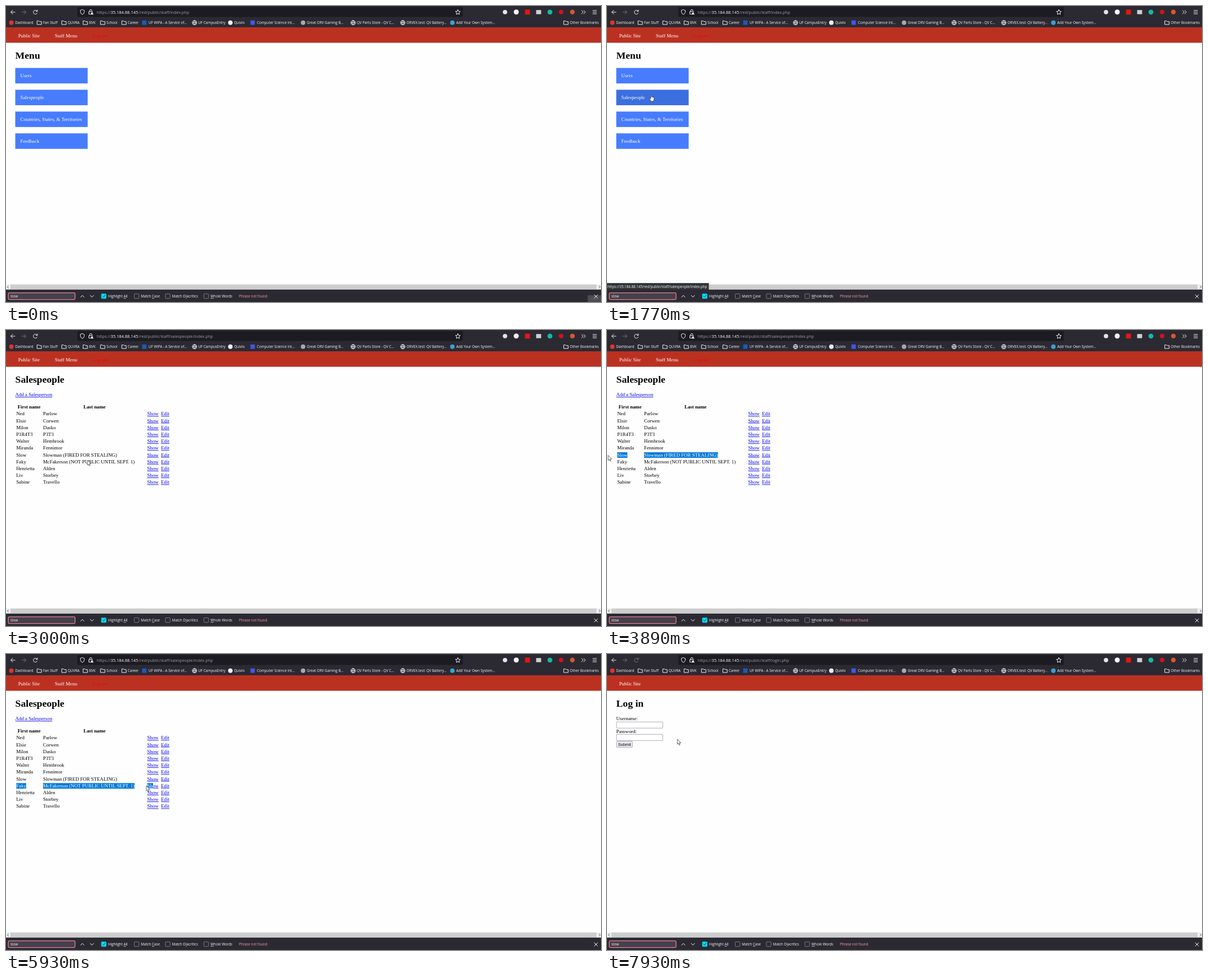
An HTML page for the animation above (8 s loop, 1060 by 528 pixels).

```html
<!DOCTYPE html>
<html lang="en">
<head>
<meta charset="utf-8">
<title>Staff menu walkthrough</title>
<style>
html, body { margin: 0; width: 100%; height: 100%; overflow: hidden; background: #fefefe; }
svg { display: block; width: 1060px; height: 528px; }
text { white-space: pre; }
.ui { font: 6.25px "Open Sans", "Noto Sans", sans-serif; fill: #f6f6f8; }
.url { font-size: 7.2px; fill: #a09fa8; }
.page { font: 8.83px "Liberation Serif", "Times New Roman", serif; fill: #000; }
.title { font-size: 17.67px; font-weight: bold; }
.bold { font-weight: bold; }
.white { fill: #fff; }
.link { fill: #0000ee; text-decoration: underline; }
.line { fill: none; stroke: #f0f0f4; stroke-width: 1; stroke-linecap: round; stroke-linejoin: round; }
.dim { opacity: .35; }
</style>
</head>
<body>
<svg id="stage" viewBox="0 0 1060 528" xmlns="http://www.w3.org/2000/svg"></svg>
<script>
const stage = document.getElementById('stage');
const LOOP = 8000, STEP = 68;

function add(parent, tag, attrs = {}, content = '') {
  const el = document.createElementNS(stage.namespaceURI, tag);
  for (const key in attrs) el.setAttribute(key, attrs[key]);
  el.textContent = content;
  parent.append(el);
  return el;
}
const group = (parent, attrs) => add(parent, 'g', attrs);
const rect = (parent, x, y, width, height, fill, more) =>
  add(parent, 'rect', { x, y, width, height, fill, ...more });
const dot = (parent, cx, cy, r, fill) => add(parent, 'circle', { cx, cy, r, fill });
const line = (parent, d, more) => add(parent, 'path', { d, class: 'line', ...more });
const text = (parent, x, y, content, cls) => add(parent, 'text', { x, y, class: cls }, content);
const show = (el, on) => { el.style.display = on ? '' : 'none'; };
const within = (t, spans) => spans.some(([from, to]) => t >= from && t < to);

rect(stage, 0, 0, 1060, 528, '#fefefe');

// Navigation strip
rect(stage, 0, 38, 1060, 27.6, '#bb3121');
text(stage, 21.7, 55.5, 'Public Site', 'page white');
const staffNav = group(stage);
text(staffNav, 87, 55.5, 'Staff Menu', 'page white');
text(staffNav, 153.5, 55.5, 'Log out', 'page').style.fill = '#e00c12';

// Menu page
const menu = group(stage);
text(menu, 16.6, 94.3, 'Menu', 'page title');
const buttons = ['Users', 'Salespeople', 'Countries, States, & Territories', 'Feedback'].map((label, i) => {
  const y = 110.5 + i * 38.9;
  const box = rect(menu, 16.5, y, 129, 27.6, '#477cfe');
  text(menu, 25.5, y + 16.8, label, 'page white');
  return box;
});

// Salespeople page
const rows = [
  ['Ned', 'Parlow'], ['Elsie', 'Corwen'], ['Milon', 'Dasko'], ['P1R4T3', 'P3T3'],
  ['Walter', 'Hembrook'], ['Miranda', 'Fennimor'], ['Slow', 'Slowman (FIRED FOR STEALING)'],
  ['Faky', 'McFakerson (NOT PUBLIC UNTIL SEPT. 1)'], ['Henrietta', 'Alden'],
  ['Liv', 'Storbey'], ['Sabine', 'Travello']
];
const columns = [18.2, 66, 251.6, 276.2];
const rowY = i => 152.4 + i * 12.2;
const sales = group(stage);
text(sales, 16.6, 94.3, 'Salespeople', 'page title');
text(sales, 16.6, 118.4, 'Add a Salesperson', 'page link');
text(sales, 20.7, 140.2, 'First name', 'page bold');
text(sales, 138, 140.2, 'Last name', 'page bold');
rows.forEach((names, i) => [...names, 'Show', 'Edit'].forEach((cell, c) =>
  text(sales, columns[c], rowY(i), cell, c < 2 ? 'page' : 'page link')));

function makeSelection(row) {
  const id = 'clip' + row;
  const window = rect(add(stage, 'clipPath', { id }), 0, rowY(row) - 9, 0, 13);
  const g = group(sales, { 'clip-path': `url(#${id})` });
  [...rows[row], 'Show'].forEach((cell, c) => {
    const back = rect(g, columns[c], rowY(row) - 7.5, 0, 9.9, '#0078d7');
    const label = text(g, columns[c], rowY(row), cell, 'page white');
    if (c === 2) label.style.textDecoration = 'underline';
    back.setAttribute('width', label.getComputedTextLength());
  });
  return (from, to) => {
    window.setAttribute('x', from);
    window.setAttribute('width', Math.max(0, to - from));
  };
}
const selectFired = makeSelection(6), selectHidden = makeSelection(7);

// Login page
const login = group(stage);
text(login, 16.6, 94.3, 'Log in', 'page title');
['Username:', 'Password:'].forEach((label, i) => {
  text(login, 16.6, 118.3 + i * 22.3, label, 'page');
  rect(login, 17, 121.2 + i * 22.2, 82.3, 11, '#fff', { stroke: '#8f8f9d', 'stroke-width': .7, rx: .5 });
});
rect(login, 17, 155.7, 28.2, 11, '#e9e9ed', { stroke: '#8f8f9d', 'stroke-width': .7, rx: 1.5 });
text(login, 19.7, 163.9, 'Submit', 'page').style.font = '7.36px "Liberation Sans", Arial, sans-serif';

// Toolbar
rect(stage, 0, 0, 1060, 38, '#2b2a33');
rect(stage, 127, 1.8, 687, 17.6, '#1c1b22', { rx: 2.2 });
line(stage, 'M16 11H8.5M12 7.5L8.5 11L12 14.5');
line(stage, 'M28 11H35.5M32 7.5L35.5 11L32 14.5', { class: 'line dim' });
const reload = line(stage, 'M55.3 9A3.6 3.6 0 1 0 55.6 12.5M56 7V9.5H53.5');
const stop = line(stage, 'M49 8L55 14M55 8L49 14');
line(stage, 'M136 6.5L139.5 8C139.7 11.5 138.8 13.8 136 15.3C133.2 13.8 132.3 11.5 132.5 8Z');
line(stage, 'M149 10V8.4A2 2 0 0 1 153 8.4V10M148 10H154V14.5H148Z');
add(stage, 'path', { d: 'M153 10L156.5 15.5H149.8Z', fill: '#f0f0f4', stroke: '#1c1b22', 'stroke-width': .6 });
line(stage, 'M805 6.6L806.3 9.4L809.3 9.8L807.1 11.9L807.6 15L805 13.5L802.4 15L802.9 11.9L800.7 9.8L803.7 9.4Z',
  { 'stroke-width': .8 });
text(stage, 161.8, 13.7, 'https://', 'ui url');
const host = text(stage, 186.4, 13.7, '35.184.88.145', 'ui url');
host.style.cssText = 'fill:#fbfbfe;font-size:7.5px;font-weight:500';
const path = text(stage, 236, 13.7, '', 'ui url');

dot(stage, 889, 10.8, 3.9, '#e4e4e8');
dot(stage, 909, 10.8, 4.5, '#f4f4f6');
rect(stage, 924.7, 6.5, 8.7, 8.7, '#e81515');
rect(stage, 944.5, 7.2, 8.8, 7.4, '#d0d0d4');
dot(stage, 969, 10.8, 4.4, '#13b9a8');
dot(stage, 989, 10.8, 4, '#d5101b');
dot(stage, 1009, 10.8, 4.2, '#d5582e');
line(stage, 'M1025.5 8L1028.3 11L1025.5 14M1029.3 8L1032.1 11L1029.3 14');
line(stage, 'M1045.5 8H1052M1045.5 11H1052M1045.5 14H1052', { 'stroke-width': .8 });

// Bookmarks: icon kind or colour, text position, label
function folder(x) {
  line(stage, `M${x - 3.7} 26.7H${x - .8}L${x + .3} 27.8H${x + 3.8}V33H${x - 3.7}Z`, { 'stroke-width': .8 });
}
function globe(x) {
  line(stage, `M${x - 3.9} 29.8A3.9 3.9 0 1 1 ${x + 3.9} 29.8A3.9 3.9 0 1 1 ${x - 3.9} 29.8H${x + 3.9}` +
    `M${x} 25.9Q${x - 3.5} 29.8 ${x} 33.7Q${x + 3.5} 29.8 ${x} 25.9`, { 'stroke-width': .75 });
}
[
  ['#e0342c', 16.3, 'Dashboard'], [folder, 66, 'Fan Stuff'], [folder, 110, 'QUVRA'], [folder, 148, 'BVK'],
  [folder, 179, 'School'], [folder, 217, 'Career'], ['#1e59b5', 254, 'UF WIPA - A Service of...', 1],
  [globe, 342.5, 'UF CampusEntry'], ['#f1f1f1', 406.5, 'Quivlo'], ['#4255e6', 447, 'Computer Science Int...', 1],
  ['#aaa9a7', 536, 'Great ORV Gaming B...'], [globe, 625, 'QV Parts Store - QV C...'],
  [globe, 713.5, 'ORVEX.test: QV Battery...'], ['#3aa0d2', 802, 'Add Your Own System...'],
  [folder, 1004.3, 'Other Bookmarks']
].forEach(([icon, x, label, square]) => {
  if (typeof icon === 'function') icon(x - 6.6);
  else if (square) rect(stage, x - 11.5, 25.8, 7.8, 7.8, icon);
  else dot(stage, x - 6.8, 29.7, 4, icon);
  text(stage, x, 32.1, label, 'ui');
});

// Scrollbar and find bar
rect(stage, 0, 496.4, 1060, 9.6, '#f0f0f0');
rect(stage, 8, 496.8, 1044, 8.6, '#cdcdcd');
line(stage, 'M4.4 499L2.4 501.1L4.4 503.2M1056.6 499L1058.6 501.1L1056.6 503.2', { style: 'stroke:#505050' });
rect(stage, 0, 505.8, 1060, 22.2, '#2b2a33');
rect(stage, 4, 511.6, 119, 12, '#42414d', { stroke: '#f08088', 'stroke-width': 1.3, rx: 1.8 });
text(stage, 8, 520, 'slow', 'ui');
line(stage, 'M133 519.3L136 516.2L139 519.3M150 516.2L153 519.3L156 516.2');
[
  [170, 'Highlight ', 'A', 'll'], [228.5, 'Match ', 'C', 'ase'],
  [284, 'Match D', 'i', 'acritics'], [352.5, '', 'W', 'hole Words']
].forEach(([x, before, key, after], i) => {
  rect(stage, x, 513.4, 8.3, 8.3, i ? '#2b2a33' : '#00ddff',
    { stroke: i ? '#8f8f9d' : '#00ddff', 'stroke-width': .8, rx: 1 });
  const label = text(stage, x + 11.8, 520, before, 'ui');
  add(label, 'tspan', { 'text-decoration': 'underline' }, key);
  label.append(after);
});
line(stage, 'M172 517.6L173.7 519.4L176.6 515.7', { style: 'stroke:#2b2a33' });
text(stage, 415, 520, 'Phrase not found', 'ui').style.fill = '#ff9aa2';

const tooltip = group(stage);
rect(tooltip, 1036.3, 516, 24, 12, '#4c4c52');
text(tooltip, 1041, 525, 'Close', 'ui').style.cssText = 'font-size:5px;fill:#68686e';
line(stage, 'M1048 515L1054 521M1054 515L1048 521');

// Status popup
const status = group(stage);
const statusBox = rect(status, 0, 494.2, 145.5, 11.8, '#303338');
const statusText = text(status, 1, 502.6, '', 'ui');

// Pointer shapes
const halo = dot(stage, 0, 0, 5, '#ffee2a');
halo.style.opacity = .8;
const pointer = group(stage);
const shape = (d, more) => add(pointer, 'path', { d, fill: '#fff', stroke: '#222', 'stroke-width': .7, ...more });
const shapes = {
  arrow: shape('M0 0V9L2 7.2L3.4 10.4L4.8 9.8L3.5 6.7H6.3Z'),
  hand: shape('M0 1C0 -.2 1.6 -.2 1.6 1V4.2L5 5Q6.2 5.3 6 6.5L5.4 9.5L4.8 12H.7L-2 8.2C-2.8 6.8 -1.7 6.2 0 7.6Z'),
  beam: shape('M-1.6 -4H1.6M0 -4V4M-1.6 4H1.6', { fill: 'none', stroke: '#77705a', 'stroke-width': .9 })
};

// Pointer steps: time, x, y, shape
const moves = [
  [0, 1046, 522, ''], [70, 1040, 505, 'arrow'], [470, 351, 265, 'arrow'], [540, 366, 297, 'arrow'],
  [740, 366, 297, 'arrow'], [1290, 142.5, 197.5, 'hand'], [1500, 112, 172, 'hand'], [1770, 78, 158, 'hand'],
  [2100, 78.5, 161, 'beam'], [2440, 78, 161, 'arrow'], [2860, 145, 232, 'arrow'], [3000, 145, 232, 'arrow'],
  [3270, 207, 222, 'beam'], [3680, 8, 223, 'beam'], [3740, 2, 223.5, 'arrow'], [4150, 2, 223.5, 'arrow'],
  [4570, 14, 234, 'beam'], [4700, 14, 234, 'beam'], [4800, 17, 235, 'beam'], [5050, 235.5, 237, 'beam'],
  [5370, 256, 236, 'beam'], [5510, 256, 236, 'hand'], [5930, 250, 235, 'arrow'], [6130, 250, 235, 'arrow'],
  [6830, 161, 62, 'arrow'], [6900, 160, 58, 'hand'], [7100, 157, 53, 'hand'], [7400, 157, 53, 'arrow'],
  [7720, 157, 53, 'arrow'], [7930, 125.3, 152, 'arrow'], [LOOP, 125.3, 152, 'arrow']
];
function pointerAt(t) {
  const i = moves.findIndex((m, k) => k && t < m[0]) - 1;
  const [t0, x0, y0, kind] = moves[i], [t1, x1, y1] = moves[i + 1];
  const p = Math.floor((t - t0) / STEP) * STEP / (t1 - t0);
  return { x: x0 + (x1 - x0) * p, y: y0 + (y1 - y0) * p, kind };
}

const base = 'https://35.184.88.145', staff = '/red/public/staff/';
const loading = 'Transferring data from 35.184.88.145...';
const messages = [
  [1640, 1900, base + staff + 'salespeople/index.php'], [1970, 2300, loading],
  [5440, 5650, base + staff + 'salespeople/show.php?id=8'],
  [6970, 7100, base + staff + 'logout.php'], [7100, 7580, loading]
];

function draw(t) {
  const onMenu = t < 2300, onLogin = t >= 7580;
  show(menu, onMenu);
  show(sales, !onMenu && !onLogin);
  show(login, onLogin);
  show(staffNav, !onLogin);
  show(tooltip, t < 70);
  path.textContent = staff + (onLogin ? 'login.php' : t < 1970 ? 'index.php' : 'salespeople/index.php');

  const busy = within(t, [[1970, 2370], [7100, 7720]]);
  show(stop, busy);
  show(reload, !busy);
  reload.style.opacity = within(t, [[2370, 2800], [7720, LOOP]]) ? .35 : 1;

  buttons[1].style.fill = t >= 1570 ? '#3b6fe0' : '';
  buttons[2].style.fill = within(t, [[1360, 1500]]) ? '#3b6fe0' : '';

  const message = messages.find(([from, to]) => t >= from && t < to);
  show(status, message);
  if (message) {
    statusText.textContent = message[2];
    statusBox.setAttribute('width', Math.max(145.5, statusText.getComputedTextLength() + 4));
  }

  const { x, y, kind } = pointerAt(t);
  pointer.setAttribute('transform', `translate(${x} ${y})`);
  for (const name in shapes) show(shapes[name], name === kind);
  halo.setAttribute('cx', x);
  halo.setAttribute('cy', y);
  show(halo, within(t, [[1900, 2030], [3270, 3740], [4780, 5440], [6130, 6200], [7030, 7100]]));

  selectFired(t < 3740 ? x : 0, within(t, [[3270, 4780]]) ? 207 : 0);
  selectHidden(0, within(t, [[4780, 6200]]) ? (t < 5120 ? x - 30.5 : t < 5370 ? x : 262) : 0);
}

const start = performance.now();
function tick() {
  draw((performance.now() - start) % LOOP);
  requestAnimationFrame(tick);
}
tick();
</script>
</body>
</html>
```
